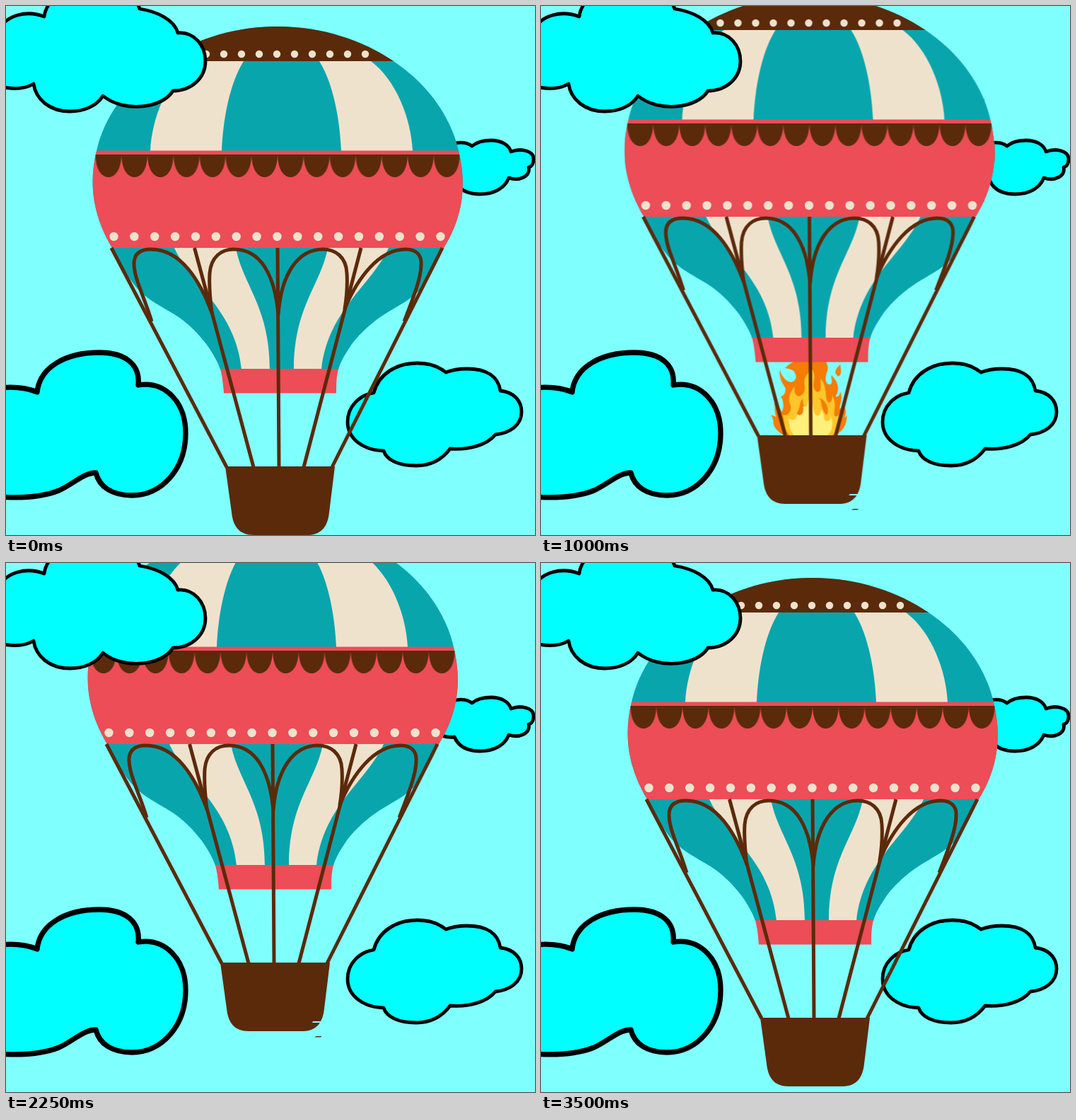
These frames come from a looping animation (748x748 px, 3.75 s). An HTML page:

```html
<!DOCTYPE html>
<html lang="en">
<head>
<meta charset="utf-8">
<title>Hot air balloon</title>
<style>
  html, body { margin: 0; width: 100%; height: 100%; overflow: hidden; background: #80ffff; }
  svg { display: block; width: 100%; height: 100%; }

  .cloud path { fill: #0ff; stroke: #000; stroke-width: 4.8; stroke-linejoin: round; }
  .cloud .near { stroke-width: 7.3; }
  .brown { fill: #5b2a0b; }
  .teal { fill: #09a5ad; }
  .cream { fill: #efe2cc; }
  .coral { fill: #ec4d57; }
  .dots { fill: none; stroke: #efe2cc; stroke-linecap: round; }
  .ropes { fill: none; stroke: #5b2a0b; stroke-width: 5; stroke-linejoin: round; }

  #balloon { animation: drift 3750ms step-end infinite; }
  #flame { animation: burn 3750ms step-end infinite; }
  #specks { animation: specks 3750ms step-end infinite; }

  @keyframes drift {
    0% { transform: translate(0, 0); }
    13.333% { transform: translate(0, -8px); }
    20% { transform: translate(-2px, -23px); }
    26.666% { transform: translate(-4.5px, -44px); }
    33.333% { transform: translate(-6px, -63px); }
    40% { transform: translate(-7px, -86px); }
    46.666% { transform: translate(-8.3px, -103px); }
    60% { transform: translate(-7px, -86px); }
    66.666% { transform: translate(-6px, -63px); }
    73.333% { transform: translate(-4.5px, -44px); }
    80% { transform: translate(-2px, -23px); }
    93.333%, 100% { transform: translate(0, -8px); }
  }
  @keyframes burn {
    0% { visibility: hidden; }
    6.666% { visibility: visible; }
    53.333%, 100% { visibility: hidden; }
  }
  @keyframes specks {
    0% { visibility: hidden; }
    26.666% { visibility: visible; }
    80%, 100% { visibility: hidden; }
  }
</style>
</head>
<body>
<svg viewBox="0 0 748 748">
  <defs>
    <clipPath id="envelope">
      <path d="M384 29C448 29 505 49 548 78C600 113 630 160 640 205C651 250 648 295 619 342
        C610 362 600 384 585 402C570 417 552 425 535 436C518 447 502 461 489 478C479 493 473 503 470 514
        L303 514C300 504 293 492 284 479C271 462 256 447 238 436C220 425 203 417 188 402
        C172 384 161 364 150 342C122 295 117 250 128 205C138 160 168 113 221 78C263 49 320 29 384 29Z"/>
    </clipPath>
    <pattern id="scallop" x="126.4" y="210" width="36.8" height="40" patternUnits="userSpaceOnUse">
      <path class="brown" d="M0 0C.4 22 9 32 18.4 32S36.4 22 36.8 0Z"/>
    </pattern>
  </defs>

  <rect width="748" height="748" fill="#80ffff"/>

  <g class="cloud">
    <path d="M605 238C598 220 600 190 635 194C645 192 652 193 659 198C666 192 676 190 686 190
      C700 190 711 196 714 206C730 200 746 206 746 216C746 223 744 227 739 228C742 241 726 248 711 243
      C705 258 690 266 670 266C653 266 640 260 634 246C625 247 615 245 605 238Z"/>
    <path d="M520 547C527 520 552 505 582 505C598 505 612 510 622 518C632 514 642 513 652 513
      C680 513 696 524 699 544C718 546 729 558 729 574C729 593 712 604 692 606C680 621 654 628 628 626
      C616 642 600 650 580 650C555 650 538 642 534 629C505 628 483 612 483 588C483 566 500 550 520 547Z"/>
    <path class="near" d="M-10 540C10 538 30 540 44 546C48 510 85 490 132 490C170 490 190 508 187 536
      C225 530 254 560 254 604C254 655 220 692 178 692C150 692 132 680 127 660C110 660 95 676 75 685
      C50 695 20 696 -10 694Z"/>
  </g>

  <g id="balloon">
    <g id="flame" transform="translate(0 8)">
      <path fill="#f57c05" d="M348 643C337 637 332 629 333 622L330 614L337 617C334 608 336 604 334 597
        C341 601 343 607 345 610C349 602 347 592 343 588C349 588 351 580 350 576C346 570 341 563 342 550
        C345 560 351 567 358 568C364 566 367 562 364 556C362 550 356 549 350 548C354 543 360 539 366 538
        L407 538C411 546 411 550 408 556C405 566 409 573 414 571C418 568 414 562 415 558C424 566 428 578 421 588
        C425 590 427 586 428 581C432 594 426 600 427 606C430 604 432 602 431 598C437 606 436 614 433 619
        L437 615C437 630 430 638 420 643ZM428 543C420 549 418 555 425 560C431 556 428 550 428 543Z"/>
      <path fill="#fdc62b" d="M356 643C346 632 350 622 346 614C354 617 360 608 357 600C353 590 357 582 363 574
        C362 584 366 590 372 587C381 581 376 572 377 565C378 558 386 554 384 546C392 552 392 560 390 568
        C389 577 393 584 398 581C402 577 399 570 400 563C410 574 405 588 410 596C415 598 417 592 416 586
        C424 600 417 610 420 616C424 618 427 613 427 610C431 624 426 636 416 643Z"/>
      <path fill="#f57c05" d="M366 612C372 604 369 596 375 591C374 600 379 604 376 612C374 618 368 618 366 612Z
        M404 608C400 602 402 596 398 590C408 594 411 604 410 611C409 616 406 614 404 608Z"/>
      <path fill="#fff07c" d="M362 643C354 634 357 626 354 619C362 624 367 620 366 613C372 617 377 612 375 602
        C382 606 380 598 384 590C391 600 388 608 393 614C398 618 401 612 400 606C407 614 402 620 408 623
        C413 624 414 619 414 616C419 628 416 638 409 643Z"/>
    </g>

    <g clip-path="url(#envelope)">
      <rect class="teal" x="110" y="20" width="550" height="500"/>
      <rect class="brown" x="110" y="20" width="550" height="58"/>
      <g class="cream">
        <path d="M336 78C316 110 307 160 305 205H204C206 160 227 105 263 78Z"/>
        <path d="M443 78C463 110 472 160 474 205H575C573 160 552 105 516 78Z"/>
        <path d="M238 342C262 395 325 430 333 514H373C373 425 335 395 325 342Z"/>
        <path d="M541 342C517 395 455 430 446 514H407C407 425 445 395 455 342Z"/>
      </g>
      <rect class="coral" x="110" y="204.500" width="550" height="137.500"/>
      <rect x="126.4" y="210" width="515.2" height="33" fill="url(#scallop)"/>
      <rect class="brown" x="126.4" y="210" width="515.2" height="2"/>
    </g>
    <path class="dots" stroke-width="10.4" stroke-dasharray="0 25" d="M258 68H509"/>
    <path class="dots" stroke-width="12.4" stroke-dasharray="0 28.87" d="M152.5 326H615"/>
    <path class="coral" d="M303 513H470C467 525 467 535 467 547.500H308C307 535 306 525 303 513Z"/>

    <g class="ropes">
      <path d="M149 342L312 652M266.500 342L350 652M384 342L386 652M502 342L421 652M617 342L461 652"/>
      <path d="M206 446C195 410 181 385 181 364C181 350 190 344 205 344C248 344 275 390 291 434
        C288 410 287 395 288 378C290 354 305 344 322 344C360 344 380 380 385 436
        C389 380 412 344 448 344C465 344 481 354 482 378C483 395 482 410 479 428
        C497 385 527 344 565 344C580 344 588 352 587 366C587 385 575 415 563 446"/>
    </g>
    <path class="brown" d="M310 651H465L457 716C455 736 446 747 428 748H350C330 748 321 736 319 716Z"/>
    <g id="specks">
      <path fill="#80ffff" d="M441 734H453V736H440Z"/>
      <path class="brown" d="M446 755H453.500L452 756.600H443Z"/>
    </g>
  </g>

  <g class="cloud">
    <path d="M-8 32C0 14 28 5 54 15C56 0 64 -20 120 -20C165 -20 185 -10 189 4C215 8 238 20 243 38
      C266 36 282 56 282 78C282 102 262 120 236 120C222 144 168 152 137 127C128 142 110 149 90 149
      C62 149 42 132 39 110C26 118 10 118 -8 114Z"/>
  </g>
</svg>
</body>
</html>
```
